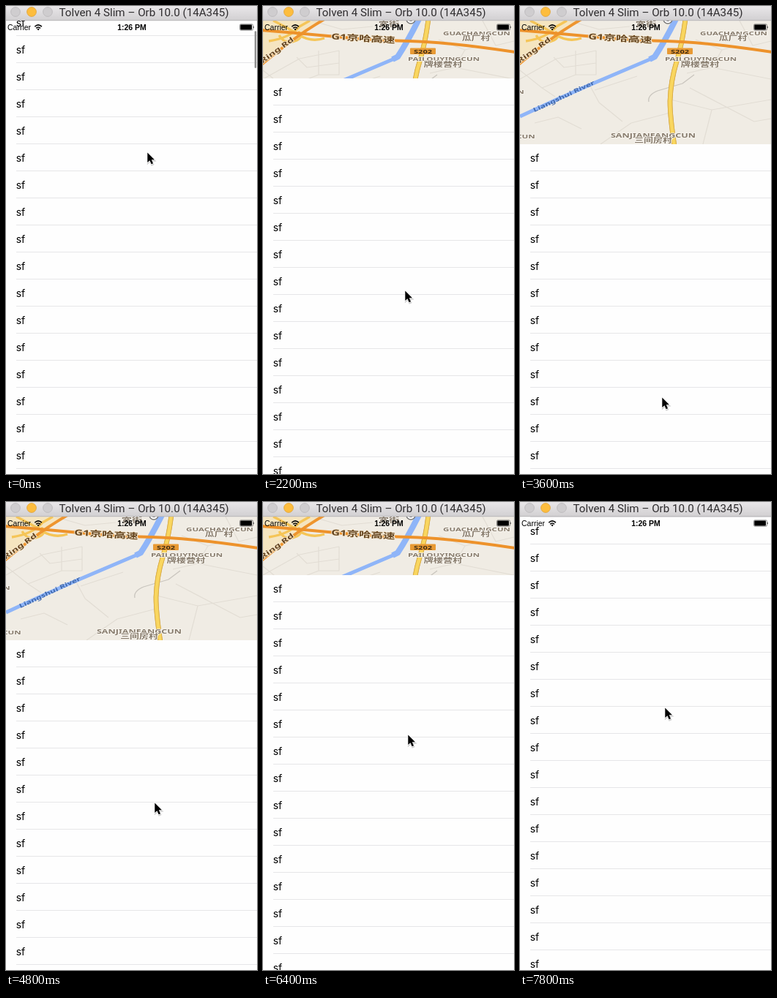
Write an HTML page that moves like this. It is 343 px wide and 640 px high and loops after 8 s.

```html
<!DOCTYPE html>
<html lang="en">
<head>
<meta charset="utf-8">
<title>Collapsing map header</title>
<style>
  html, body { margin: 0; width: 100%; height: 100%; overflow: hidden; background: #fefefe; }
  svg { display: block; width: 343px; height: 640px; }
  text { font-family: Inter, Roboto, sans-serif; }
  .status text { font: 10.5px "Liberation Sans", Arial, sans-serif; }
  .map text { font-family: "Noto Sans", "Noto Sans CJK SC", "Noto Sans CJK", sans-serif; text-anchor: middle; }
  .map path { fill: none; stroke-linejoin: round; }
  .place { fill: #85796a; font-weight: 600; stroke: #f8f5ef; stroke-width: 1.4px; paint-order: stroke; }
  .road { fill: #65451f; font-weight: 600; stroke: #f7ead2; stroke-width: 1.4px; paint-order: stroke; }
  .shield { fill: #3c2a12; font-weight: 700; }
  .river { fill: #3f68ac; font-weight: 600; }
</style>
</head>
<body>
<svg viewBox="0 0 343 640">
  <defs>
    <linearGradient id="chrome" x2="0" y2="1">
      <stop stop-color="#e9e7e9"/><stop offset="1" stop-color="#d1cfd1"/>
    </linearGradient>
    <clipPath id="mapClip"><rect id="mapWindow" y="20" width="343" height="0"/></clipPath>
    <path id="arrow" d="M0 0V16L3.7 12.6L6.3 18.6L9.1 17.4L6.5 11.6H11.4Z"/>
  </defs>
  <rect width="343" height="640" fill="#fefefe"/>
  <g id="rows"></g>
  <rect id="scrollbar" x="339.7" width="2.4" height="50.5" rx="1.2" fill="#8d8d8d"/>

  <g class="map" clip-path="url(#mapClip)">
    <rect y="20" width="343" height="169" fill="#f0ece4"/>
    <path d="M0 20H82L40 48L0 80Z" style="fill:#f5e5c0"/>
    <g stroke="#e2ddd4" stroke-width="1.2">
      <path d="M0 100L50 72L104 61M46 70L60 84L104 78M76 61V94L30 112M104 61V94H76M0 88L30 112L48 124"/>
      <path d="M93 104L108 132L140 158M102 115L160 96M20 160L52 152L84 168M66 20L108 32L150 28"/>
      <path d="M228 92L262 84L343 100M262 84L276 60M300 20L318 54L343 48M240 46L276 60L292 56"/>
      <path d="M206 128L262 142L343 128M262 142L250 189M232 112L320 158L343 154M110 189L152 160L205 146"/>
    </g>
    <path d="M176 131Q174 122 188 116L222 106L238 94" stroke="#c9c5be" stroke-width="1.3"/>
    <path d="M0 151L52 127L95 108L182 71" stroke="#8fb5f8" stroke-width="5"/>
    <path d="M177 73L184 69.5Q197 50 214 16" stroke="#8fb5f8" stroke-width="8"/>
    <path d="M14 20Q34 30 50 40T84 44M8 48Q36 44 50 28L64 20M22 40Q30 54 46 47Q56 42 48 35" stroke="#f5c557" stroke-width="3.4"/>
    <path d="M-2 80Q20 62 40 47T84 18" stroke="#ee952f" stroke-width="4"/>
    <g id="road">
      <path id="yellowRoad" d="M226 18Q222 50 214 76T205 130Q205 152 211 191" stroke="#d9ad48" stroke-width="6.6"/>
      <use href="#yellowRoad"/>
      <path d="M226 18Q222 50 214 76T205 130Q205 152 211 191" stroke="#f9d65f" stroke-width="4.8"/>
    </g>
    <path d="M-2 33Q50 37 100 42T200 48T345 63" stroke="#ed922b" stroke-width="4"/>
    <rect x="201" y="57.5" width="35" height="8.5" rx="1" fill="#e89a34"/>
    <circle cx="202" cy="18" r="6" fill="#fff" stroke="#777" stroke-width="1.5"/>
    <circle cx="202" cy="18" r="3" fill="#777"/>
    <g id="labels"></g>
  </g>

  <g class="status">
    <text x="2" y="33">Carrier</text>
    <path d="M39.3 28.2Q44 23.6 48.9 28.2M41.2 30.3Q44 27.7 47 30.3" fill="none" stroke="#000" stroke-width="1.6"/>
    <path d="M42.5 31.5Q44.1 30.2 45.7 31.5L44.1 33.4Z"/>
    <text x="172" y="33" text-anchor="middle" style="font-weight:bold">1:26 PM</text>
    <rect x="319.5" y="24.9" width="18" height="8.2" rx="1.5" fill="none" stroke="#555" stroke-width=".7"/>
    <rect x="320.3" y="25.6" width="15.7" height="6.8" rx=".8"/>
    <path d="M338.3 27.5Q340 29 338.3 30.5Z"/>
  </g>

  <rect width="343" height="20" fill="url(#chrome)"/>
  <rect y="19.3" width="343" height=".9" fill="#b7b5b7"/>
  <g fill="#cfcdcf" stroke="#b9b7b9" stroke-width=".8">
    <circle cx="13" cy="8" r="6.4"/>
    <circle cx="35" cy="8" r="6.4" fill="#fdbd3e" stroke="#dfa135"/>
    <circle cx="57" cy="8" r="6.4"/>
  </g>
  <text x="188.5" y="14" text-anchor="middle" fill="#2f2d2f" style="font:15.2px Roboto,sans-serif">Tolven 4 Slim – Orb 10.0 (14A345)</text>

  <g id="cursor">
    <use href="#arrow" transform="translate(.5 1.5)" opacity=".2" stroke="#000" stroke-width="2"/>
    <use href="#arrow" stroke="#fff" stroke-width="1.6" paint-order="stroke"/>
  </g>
</svg>
<script>
const LOOP = 8000, STEP = 200;
const MAP_TOP = 20, MAP_HEIGHT = 169, ROW = 37;
const byId = id => document.getElementById(id);

// Keys are [time, value...], joined by straight lines.
const cursorKeys = [
  [0, 193, 200], [1000, 194, 278], [2200, 194, 389], [3600, 194, 535], [4000, 195, 590],
  [4200, 197, 578], [4800, 203, 411], [6400, 198, 318], [6800, 198, 281], [8000, 198, 281]
];
const scrollKeys = [
  [0, 296], [1000, 204], [2200, 90], [3060, 0], [4880, 0],
  [6400, 89], [6800, 163], [7000, 191], [7200, 205], [8000, 205]
];

function sample(keys, time) {
  const next = Math.max(1, keys.findIndex(key => key[0] > time));
  const a = keys[next - 1], b = keys[next];
  const k = (time - a[0]) / (b[0] - a[0]);
  return a.slice(1).map((v, i) => v + (b[i + 1] - v) * k);
}

// The map picture is squashed vertically, lettering included.
function label(text, x, y, size, kind = 'place', angle = 0) {
  return `<text class="${kind}" transform="translate(${x} ${y}) rotate(${angle}) scale(1.5 1)" font-size="${size}">${text}</text>`;
}

byId('labels').innerHTML = [
  label('GUACHANGCUN', 292, 39.5, 7.7),
  label('瓜厂村', 291, 46.5, 8.6),
  label('PAILOUYINGCUN', 247, 75.3, 7.7),
  label('牌楼营村', 246, 82.7, 8.8),
  label('SANJIANFANGCUN', 182, 180, 8.4),
  label('三间房村', 182, 187.3, 8.6),
  label('CUN', 8, 180.5, 7.7),
  label('N', 1, 120, 7.7),
  label('宽街', 172, 27.5, 9.5),
  label('S202', 218.5, 64.7, 7.4, 'shield'),
  label('G1京哈高速', 136.5, 48, 11, 'road', 3.5),
  label('Ring Rd', 21, 63, 9.4, 'road', -36),
  label('Liangshui River', 61, 126, 7.9, 'river', -25)
].join('');

byId('rows').innerHTML = Array.from({ length: 26 }, (_, i) => `
  <text x="13.7" y="${i * ROW + 23.5}" font-size="14">sf</text>
  <rect x="14" y="${i * ROW + 36}" width="329" height="1" fill="#e6e6e8"/>`).join('');

function render(now) {
  const time = Math.floor(now % LOOP / STEP) * STEP;
  const scroll = Math.round(sample(scrollKeys, time)[0]);
  const [x, y] = sample(cursorKeys, time);
  byId('rows').setAttribute('transform', `translate(0 ${MAP_TOP + MAP_HEIGHT - scroll})`);
  byId('mapWindow').setAttribute('height', Math.max(0, MAP_HEIGHT - scroll));
  byId('scrollbar').setAttribute('y', 27 + (scroll - 204) / 12.5);
  byId('scrollbar').setAttribute('opacity', time < 7200 ? 1 : 0);
  byId('cursor').setAttribute('transform', `translate(${Math.round(x) + .3} ${Math.round(y) + .5}) scale(.85)`);
}

let start;
function tick(now) {
  start ??= now;
  render(now - start);
  requestAnimationFrame(tick);
}
render(0);
requestAnimationFrame(tick);
</script>
</body>
</html>
```
